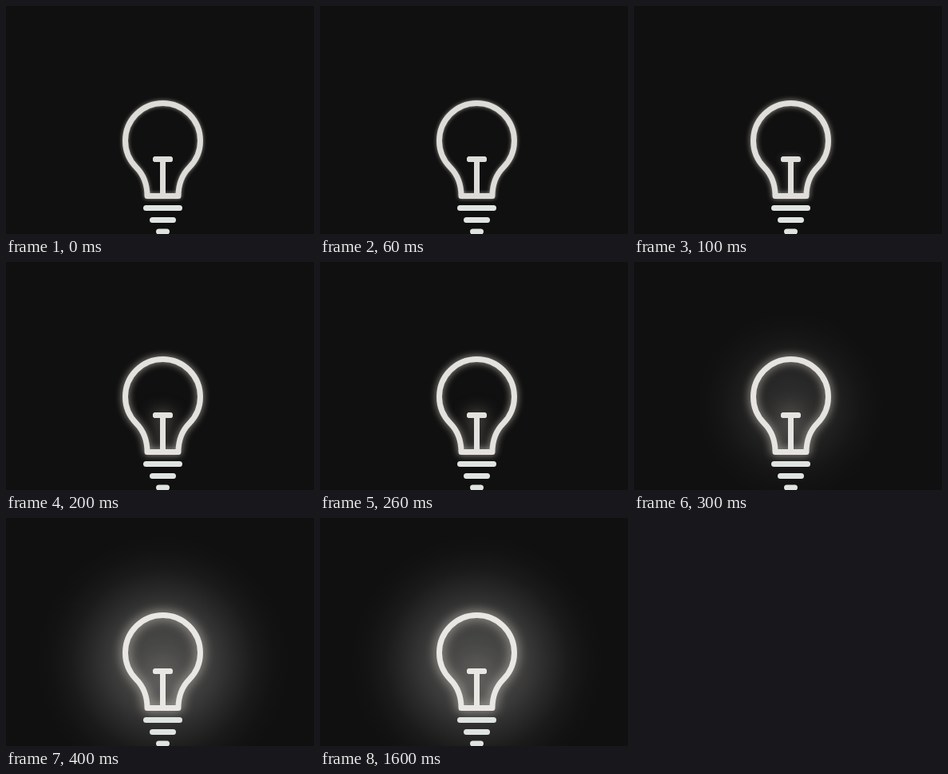
An HTML page with a canvas that plays this animation: 386x285 px, repeating every 2400 ms.

```html
<!DOCTYPE html>
<html lang="en">
<head>
<meta charset="utf-8">
<title>Light bulb</title>
<style>
html, body { margin: 0; height: 100%; overflow: hidden; background: #101010; }
canvas { display: block; }
</style>
</head>
<body>
<canvas id="stage" width="386" height="285"></canvas>
<script>
const ctx = document.getElementById('stage').getContext('2d');
const W = 386, H = 285, LOOP = 2400, STEP = 100, LAST = 4;
const CX = 196.5;

const glass = new Path2D(
  'M177 237.5C177 222 172 210.5 163.3 201.7A47 47 0 1 1 229.7 201.7' +
  'C221 210.5 216 222 216 237.5Z');
const filament = new Path2D('M196.5 237V191.5 M187.5 191.5H205.5');

// Each bar: centre height and half length without its round caps
const bars = [[252.5, 21], [267.5, 13], [282, 5]];

function halo(power) {
  const g = ctx.createRadialGradient(CX, 180, 0, CX, 180, 80 + 80 * power);
  const stops = [[0, .235], [.25, .215], [.4, .175], [.55, .11], [.72, .045], [.87, .012], [1, 0]];
  for (const [at, alpha] of stops) g.addColorStop(at, `rgba(255,253,250,${alpha * power})`);
  ctx.fillStyle = g;
  ctx.fillRect(0, 0, W, H);
}

function glow(path, blur, alpha) {
  ctx.shadowBlur = blur;
  ctx.shadowColor = `rgba(236,230,218,${alpha})`;
  ctx.stroke(path);
  ctx.shadowColor = 'transparent';
}

function draw(level) {
  ctx.fillStyle = '#101010';
  ctx.fillRect(0, 0, W, H);
  halo(Math.max(0, 2 * level - 1));

  ctx.lineWidth = 7;
  ctx.lineCap = ctx.lineJoin = 'round';
  const tone = 221 + 11 * level;
  ctx.strokeStyle = `rgb(${tone},${tone - 1},${tone - 5})`;

  // Light from the filament stays inside the glass
  ctx.save();
  ctx.clip(glass);
  glow(filament, 40 * level, level);
  ctx.restore();

  glow(glass, 5 + 9 * level, .6 + .2 * level);
  ctx.stroke(filament);

  ctx.strokeStyle = '#dfe4e1';
  for (const [y, half] of bars) {
    ctx.beginPath();
    ctx.moveTo(CX - half, y);
    ctx.lineTo(CX + half, y);
    ctx.stroke();
  }
}

// The lamp warms up in hard steps, then stays lit
const start = performance.now();
function tick() {
  const t = (performance.now() - start) % LOOP;
  draw(Math.min(LAST, Math.floor(t / STEP)) / LAST);
  requestAnimationFrame(tick);
}
tick();
</script>
</body>
</html>
```
